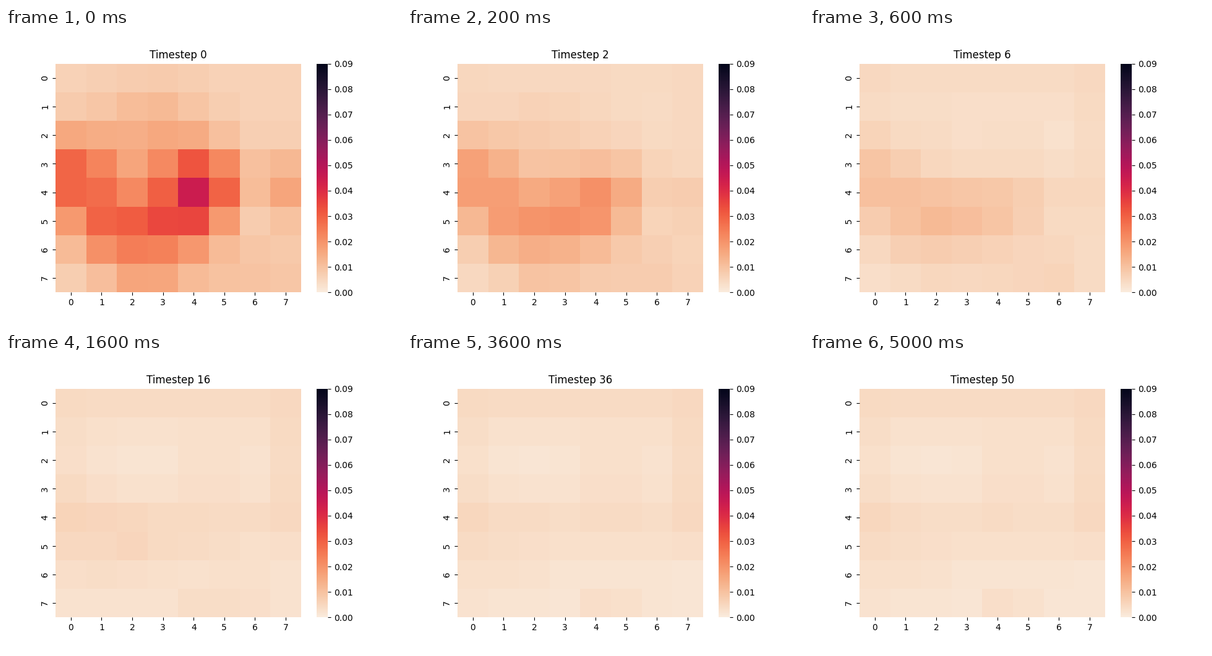
Animation, 640 px wide and 480 px high, one loop 5100 ms. Source, as a matplotlib script:

```python
import numpy as np
import matplotlib.pyplot as plt
from matplotlib.animation import FuncAnimation
from matplotlib.colors import ListedColormap, to_rgb

FRAMES, INTERVAL = 51, 100
SIZE = 8
ROW, COL = np.mgrid[:SIZE, :SIZE]


def bump(col, row, height, width, tall=None):
    """Gaussian hill over the grid, round unless a second width is given."""
    tall = tall or width
    return height * np.exp(-((COL - col) / width) ** 2 / 2
                           - ((ROW - row) / tall) ** 2 / 2)


def field(base, *bumps):
    return base + sum(bump(*b) for b in bumps)


# Cell values, in thousandths, at the first step.
START = field(
    6,
    (4.2, 3.8, 34, 0.9),
    (3.4, 5.2, 18, 0.8),
    (1.5, 5.2, 22, 0.95),
    (0, 3.4, 24, 1),
    (2.7, 2, 8, 1.2),
    (2.5, 7.3, 8, 0.8),
    (7.4, 3.9, 13, 0.8),
    (6.2, 4.5, -4, 0.8),
    (5.5, 7.2, 4, 1.8),
)

# Where they settle: bands at the top and middle, raised sides.
SETTLED = field(
    1.4,
    (3.5, 0, 2.5, 9, 0.8),
    (3.5, 4.2, 2.4, 9, 0.8),
    (0, 3.2, 1.5, 0.6, 3),
    (7, 2.2, 2.5, 0.5, 1.5),
    (4.5, 2.3, 2, 0.8),
    (1.5, 6, 1.2, 1, 0.8),
    (4.4, 7, 2.2, 0.6, 0.5),
)

# Share of the excess left after two steps.
KEEP = field(
    0.53,
    (4.2, 2.6, -0.3, 1.1),
    (7, 3, -0.4, 0.5, 1.2),
    (3.5, 0, -0.3, 9, 0.7),
    (6, 6.5, 0.25, 1),
    (2, 4.3, 0.12, 0.8),
).clip(0.05, 0.9)


def values(step):
    left = KEEP ** ((step / 2) ** 0.8)
    return (SETTLED + (START - SETTLED) * left) / 1000


def rocket_r():
    """Reversed rocket colormap, rebuilt from a few colours with Hermite curves."""
    stops = ("#03051A #221331 #451C47 #6A1F56 #921C5B #B91657 "
             "#D92847 #ED513E #F47C56 #F6A47B #F7C9AA #FAEBDD").split()
    rgb = np.array([to_rgb(c) for c in stops])
    slope = np.gradient(rgb, axis=0, edge_order=2)
    x = np.linspace(0, len(stops) - 1, 256)
    i = np.minimum(x.astype(int), len(stops) - 2)
    u = (x - i)[:, None]
    curve = ((1 + 2 * u) * (1 - u) ** 2 * rgb[i] + u * (1 - u) ** 2 * slope[i]
             + u ** 2 * (3 - 2 * u) * rgb[i + 1] - u ** 2 * (1 - u) * slope[i + 1])
    return ListedColormap(np.clip(curve, 0, 1)[::-1])


fig, ax = plt.subplots(figsize=(6.4, 4.8), dpi=100)
mesh = ax.pcolormesh(values(0), cmap=rocket_r(), vmin=0, vmax=0.09)
ax.set(xlim=(0, SIZE), ylim=(SIZE, 0))
ax.spines[:].set_visible(False)
centres = np.arange(SIZE) + 0.5
ax.set_xticks(centres, range(SIZE))
ax.set_yticks(centres, range(SIZE), rotation="vertical", va="center")

bar = fig.colorbar(mesh, ax=ax, ticks=np.arange(10) / 100, format="%.2f")
bar.outline.set_linewidth(0)
title = ax.set_title("Timestep 0")


def update(step):
    mesh.set_array(values(step))
    title.set_text(f"Timestep {step}")
    return mesh, title


anim = FuncAnimation(fig, update, frames=FRAMES, interval=INTERVAL,
                     repeat=True, repeat_delay=0)
plt.show()
```
